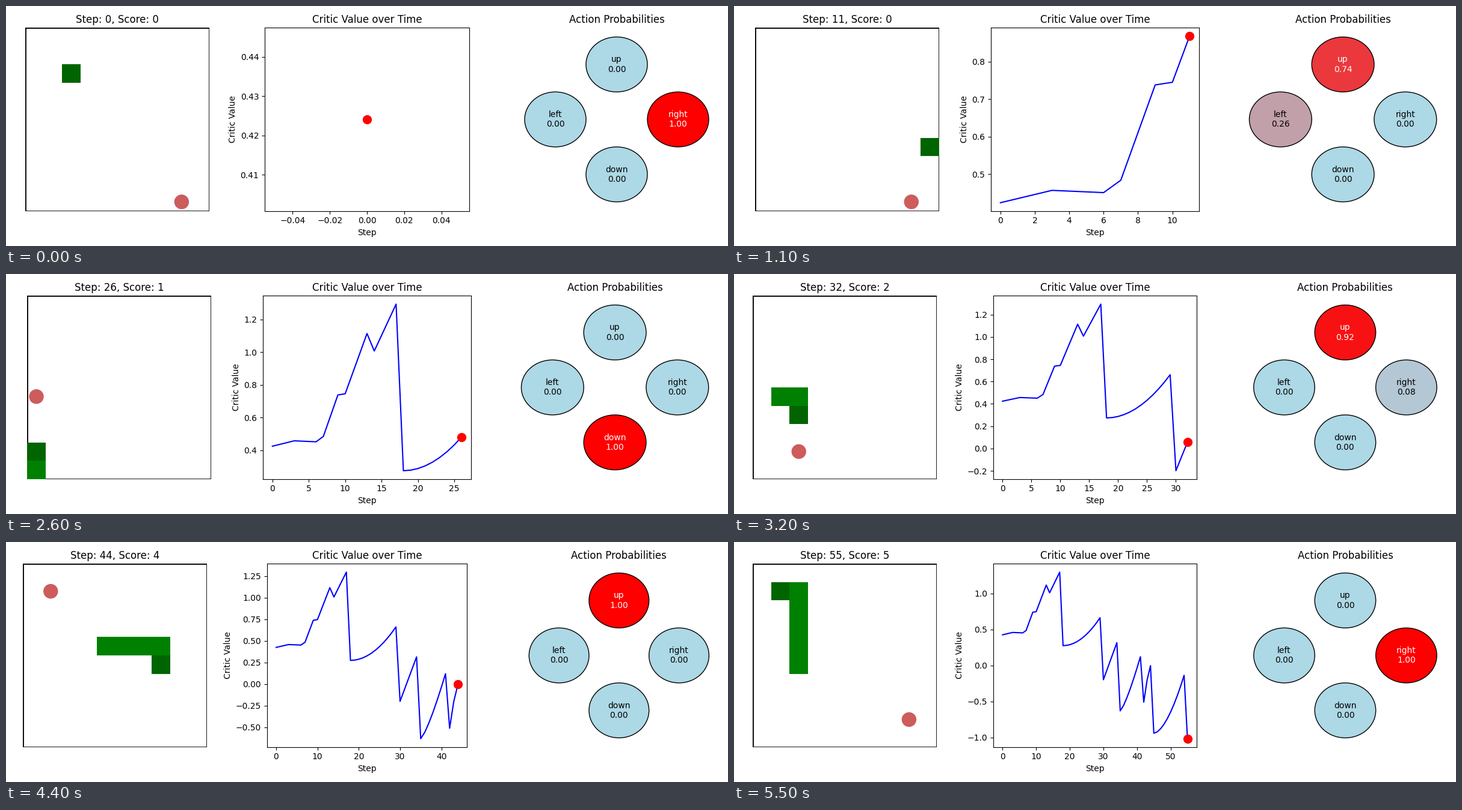
A matplotlib script for the animation above (5600 ms loop, 1200 by 400 pixels).

```python
from itertools import pairwise

import matplotlib.pyplot as plt
from matplotlib.animation import FuncAnimation
from matplotlib.colors import to_rgb
from matplotlib.patches import Circle, Rectangle
import numpy as np

SIZE = 10
START = (1, 2)
FOODS = [(8, 9), (0, 5), (2, 8), (5, 4), (7, 5), (1, 1), (8, 8)]

# Rows are counted from the top, and "up" raises the row number
MOVES = {"up": (0, 1), "down": (0, -1), "left": (-1, 0), "right": (1, 0)}
NAMES = {name[0].upper(): name for name in MOVES}
RUNS = "R8 U4 L2 R1 U3 L8 D4 R2 U3 R2 D4 R3 U1 L5 D4 L1 R1"
ACTIONS = [NAMES[run[0]] for run in RUNS.split() for _ in range(int(run[1:]))]
STEPS = len(ACTIONS)

# Steps where a second action has a share of the probability
DOUBTS = {11: ("left", 0.26), 32: ("right", 0.08),
          39: ("right", 0.22), 49: ("down", 0.24)}

# Corners of the first climb, then the ends of each later one
FIRST = [(0, 0.4241), (3, 0.457), (6, 0.451), (7, 0.484), (9, 0.738),
         (10, 0.745), (13, 1.114), (14, 1.007), (17, 1.294)]
CLIMBS = [(0.274, 0.661), (-0.199, 0.315), (-0.631, 0.12),
          (-0.51, -0.004), (-0.942, -0.138)]
LAST = -1.0175

COLD, HOT = np.array(to_rgb("lightblue")), np.array(to_rgb("red"))
REACH = 0.3


def play():
    """Return (body, food) per step and the steps at which food was eaten."""
    body, growing, states, meals = [START], False, [], []
    for step, action in enumerate(ACTIONS):
        dx, dy = MOVES[action]
        head = (body[0][0] + dx, body[0][1] + dy)
        if head not in body:
            # Growth comes one move after eating
            body = [head] + (body if growing else body[:-1])
            growing = head == FOODS[len(meals)]
            if growing:
                meals.append(step)
        states.append((body, FOODS[len(meals)]))
    return states, meals


def critic(meals):
    """Value climbs towards each meal and drops after it; long climbs start slower."""
    values = list(np.interp(range(meals[0] + 1), *zip(*FIRST)))
    for (prev, meal), (low, high) in zip(pairwise(meals), CLIMBS):
        count = meal - prev
        t = np.linspace(0, 1, count)
        values.extend(low + (high - low) * t ** (0.3 + 0.14 * count))
    return values + [LAST]


STATES, MEALS = play()
VALUES = critic(MEALS)

fig, (board, chart, policy) = plt.subplots(1, 3, figsize=(12, 4), dpi=100)


def draw_board(step):
    body, food = STATES[step]
    board.clear()
    board.set_xlim(0, SIZE)
    board.set_ylim(SIZE, 0)
    board.set_aspect("equal")
    board.axis("off")
    board.add_patch(Rectangle((0, 0), SIZE, SIZE, fill=False, edgecolor="black", lw=2))
    for i, cell in enumerate(body):
        board.add_patch(Rectangle(cell, 1, 1, lw=0,
                                  facecolor="green" if i else "darkgreen"))
    board.add_patch(Circle((food[0] + 0.5, food[1] + 0.5), 0.4, lw=0,
                           facecolor="indianred"))
    board.set_title(f"Step: {step}, Score: {len(body) - 1}")


def draw_chart(step):
    chart.clear()
    chart.plot(range(step + 1), VALUES[:step + 1], "b-")
    chart.plot(step, VALUES[step], "ro", markersize=10)
    chart.set_title("Critic Value over Time")
    chart.set_xlabel("Step")
    chart.set_ylabel("Critic Value")


def draw_policy(step):
    other, share = DOUBTS.get(step, (None, 0.0))
    probs = {other: share, ACTIONS[step]: 1 - share}
    policy.clear()
    policy.set_xlim(0, 1)
    policy.set_ylim(0, 1)
    policy.axis("off")
    for name, (dx, dy) in MOVES.items():
        p = probs.get(name, 0.0)
        center = (0.5 + REACH * dx, 0.5 + REACH * dy)
        policy.add_patch(Circle(center, REACH / 2, edgecolor="black",
                                facecolor=COLD + (HOT - COLD) * p))
        policy.text(*center, f"{name}\n{p:.2f}", ha="center", va="center",
                    color="white" if p > 0.5 else "black")
    policy.set_title("Action Probabilities")


def update(step):
    # Start every layout from the same place so it depends on the step alone
    fig.subplots_adjust(left=0.125, right=0.9, bottom=0.11, top=0.88,
                        wspace=0.2, hspace=0.2)
    draw_board(step)
    draw_chart(step)
    draw_policy(step)
    fig.tight_layout()
    # Titles sit one pixel closer to the upper edge
    fig.subplots_adjust(top=fig.subplotpars.top + 1 / 400)


anim = FuncAnimation(fig, update, frames=STEPS, interval=100, repeat=True)
plt.show()
```
